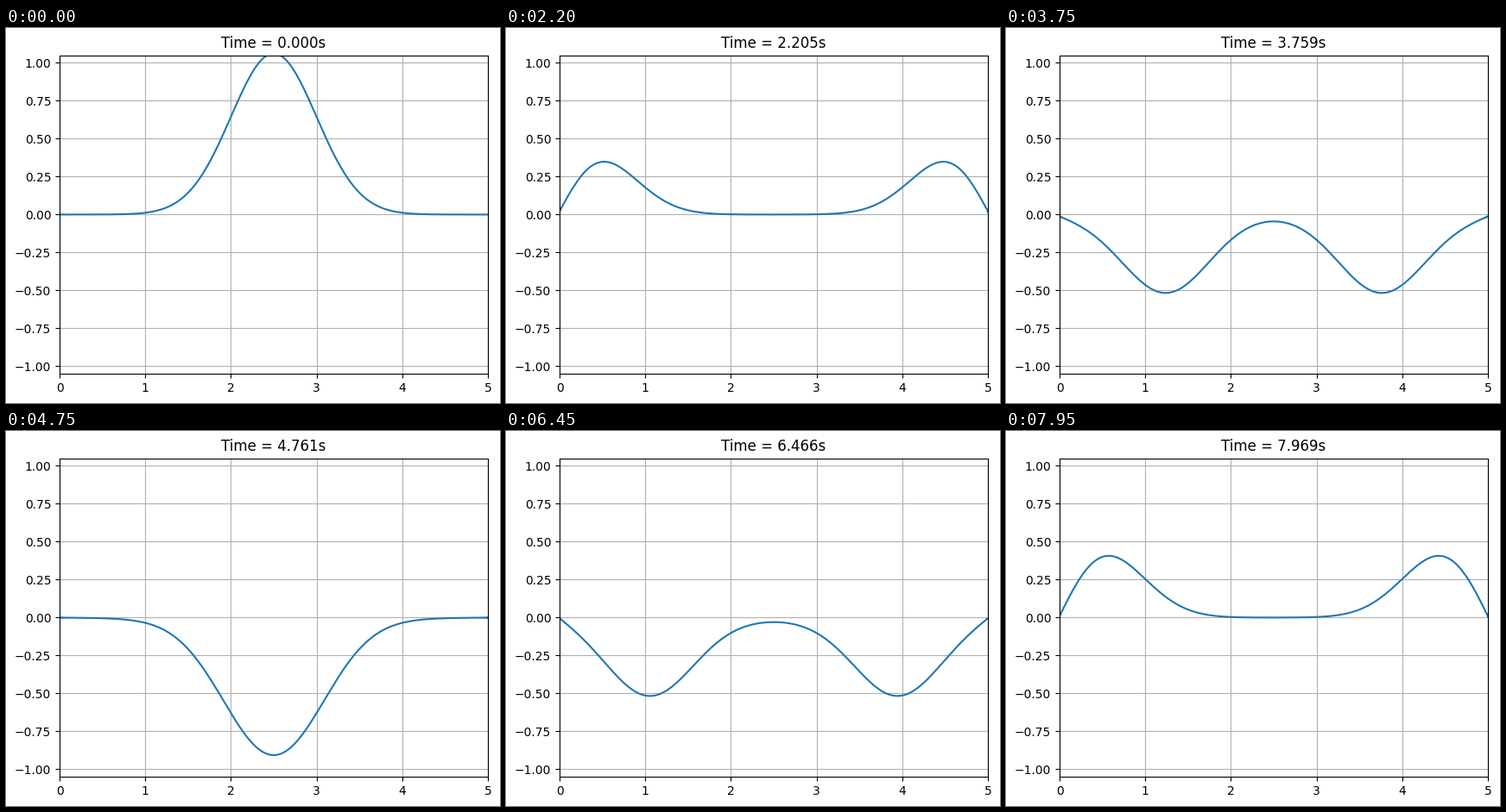
Animation of 572x435 px, one loop 8000 ms. Source, as a matplotlib script:

```python
import numpy as np
import matplotlib.pyplot as plt
from matplotlib.animation import FuncAnimation

W, H, DPI = 572, 435, 100
FRAMES, INTERVAL = 160, 50
LENGTH, POINTS, SUBSTEPS = 5, 400, 4
LOSS, TAU = 0.12, 0.35          # slightly lossy reflection at the walls

x = np.linspace(0, LENGTH, POINTS)
dt = x[1]
wall = np.minimum(x, LENGTH - x)
zigzag = 0.004 * (-1.0) ** np.arange(POINTS) * np.exp(-wall / 0.06)


def simulate():
    """Right-moving half of the string; the left-moving half is its mirror."""
    right = 0.531 * np.exp(-2 * (x - LENGTH / 2) ** 2)
    slow = 0.0
    states = []
    for frame in range(FRAMES):
        t = frame * SUBSTEPS * dt
        noise = np.clip((t - 1.4) / 0.8, 0, 1) * zigzag
        states.append(right + right[::-1] + noise)
        for _ in range(SUBSTEPS):
            right[1:] = right[:-1].copy()
            hit = right[-1]
            slow += (hit - slow) * dt / TAU
            right[0] = -((1 - LOSS) * hit + LOSS * slow)
    return states


states = simulate()

# the small margin keeps the pixel size from being rounded down
fig = plt.figure(figsize=((W + 0.01) / DPI, (H + 0.01) / DPI), dpi=DPI,
                 facecolor="white")
ax = fig.add_axes([62 / W, 33.8 / H, 496 / W, 369.6 / H])
ax.set_xlim(0, LENGTH)
ax.set_ylim(-1.05, 1.05)
ax.set_yticks(np.linspace(-1, 1, 9))
ax.grid(True)
line, = ax.plot(x, states[0], color="C0")
title = ax.set_title("Time = 0.000s")


def draw(frame):
    millis = int(frame * SUBSTEPS * dt * 1000)
    line.set_ydata(states[frame])
    title.set_text(f"Time = {millis / 1000:.3f}s")
    return line, title


anim = FuncAnimation(fig, draw, frames=FRAMES, interval=INTERVAL,
                     repeat=True, repeat_delay=0, blit=False)
plt.show()
```
